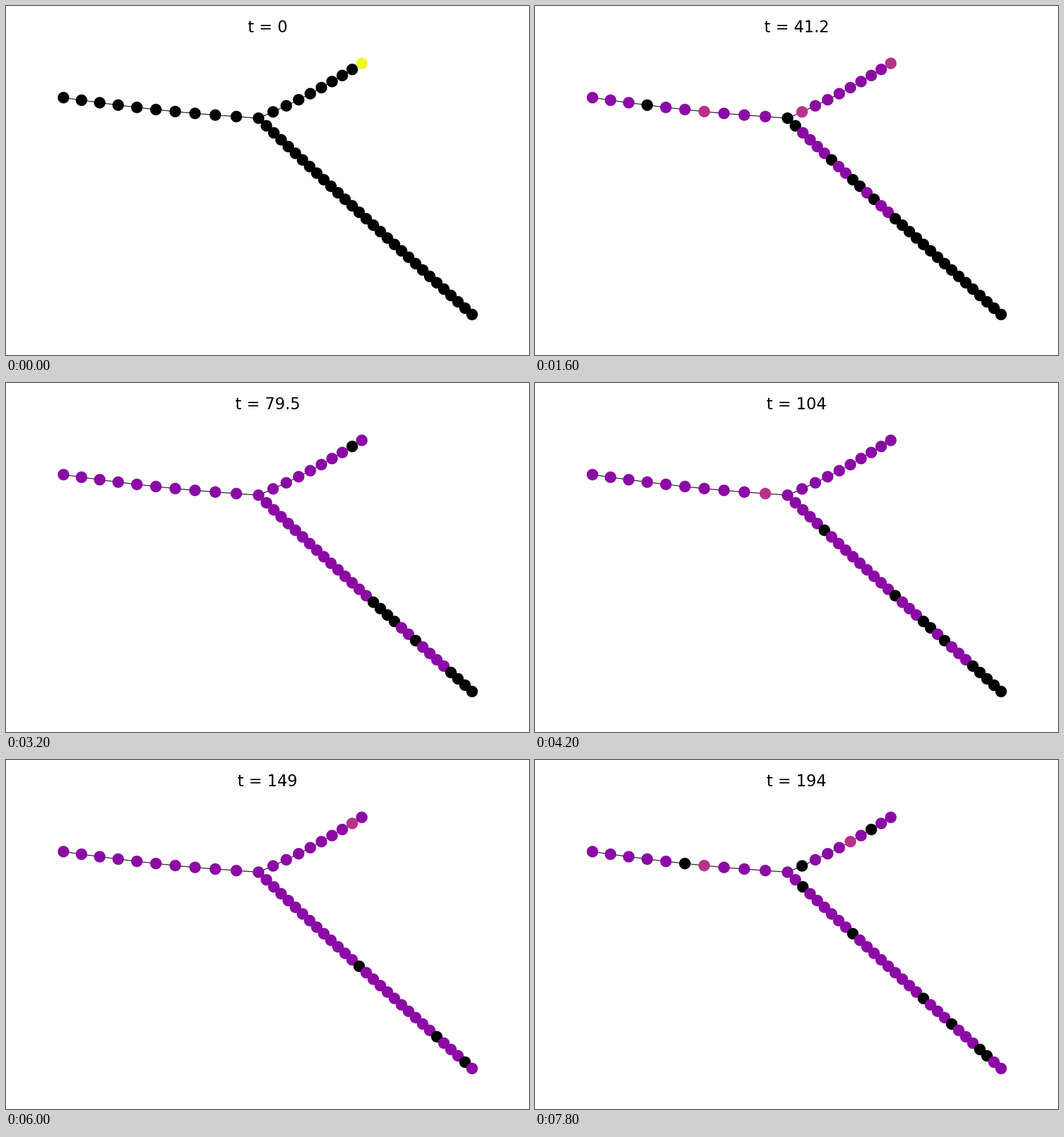
Write a matplotlib script that moves like this. It is 917 px wide and 611 px high and loops after 8000 ms.

```python
import numpy as np
import matplotlib.pyplot as plt
from matplotlib.animation import FuncAnimation

W, H, DPI = 917, 611, 100
FRAMES, STEP = 40, 200
HUB = (442.8, 196.4)
LEFT, UPPER, LOWER = 10, 9, 30   # nodes per arm


def basis(k):
    """Terms of a step length that shrinks smoothly away from the hub."""
    i = np.arange(1, max(k) + 1)
    logs = np.append(0, np.cumsum(np.log(i)))
    inverse = np.append(0, np.cumsum(1 / i))
    return np.column_stack([np.ones(len(k)), k, logs[k], inverse[k]])


def arm(count, knots, points):
    """Hub and nodes of one arm, fitted through a few key points."""
    coef = np.linalg.solve(basis([0, *knots]), np.array([HUB, *points]))
    return basis(np.arange(count + 1)) @ coef


arms = [
    arm(LEFT, [3, 6, LEFT], [(331.4, 188.0), (229.5, 177.5), (100.8, 160.4)]),
    arm(UPPER, [2, 5, UPPER], [(491.5, 174.7), (553.0, 142.9), (623.8, 100.4)]),
    arm(LOWER, [2, 10, LOWER], [(469.6, 222.1), (569.7, 315.6), (817.2, 540.1)]),
]
pos = np.vstack([[HUB]] + [a[1:] for a in arms])

# Steps from the starting tip, the end of the upper arm
dist = UPPER + np.concatenate([[0], np.arange(1, LEFT + 1),
                               -np.arange(1, UPPER + 1), np.arange(1, LOWER + 1)])


def spread(seed=4, keep=0.6, sigma=0.33):
    """Counts per frame: a pulse at the tip that evens out, with lasting noise."""
    rng = np.random.default_rng(seed)
    noise = rng.normal(size=dist.size)
    counts = [np.where(dist == 0, 6, 0)]
    for f in range(1, FRAMES):
        noise = keep * noise + np.sqrt(1 - keep ** 2) * rng.normal(size=dist.size)
        reach = 5.5 * f ** 0.67
        mean = (0.9 + 2.8 / f) * np.exp(-(dist / reach) ** 2)
        level = np.rint(mean + sigma * np.sqrt(mean) * noise)
        counts.append(level.clip(0, 6).astype(int))
    return counts


counts = spread()
times = np.interp(range(FRAMES), [0, 8, 16, 39], [0, 41.2, 79.5, 193.9])
plasma = plt.get_cmap("plasma")
palette = np.array([(0, 0, 0, 1)] + [plasma((n + 1) / 7) for n in range(1, 7)])

fig = plt.figure(figsize=(W / DPI, H / DPI), dpi=DPI, facecolor="white")
ax = fig.add_axes([0, 0, 1, 1])
ax.set(xlim=(0, W), ylim=(H, 0))
ax.axis("off")

for a in arms:
    ax.plot(*a.T, color="black", lw=0.9, zorder=1)
dots = ax.scatter(*pos.T, s=(20.2 * 72 / DPI) ** 2, c=palette[counts[0]],
                  linewidths=0, zorder=2)
title = ax.text(W / 2, 46, "t = 0", fontsize=20, family="DejaVu Sans",
                ha="center", va="baseline")


def update(f):
    dots.set_facecolor(palette[counts[f]])
    title.set_text(f"t = {times[f]:.3g}")
    return dots, title


anim = FuncAnimation(fig, update, frames=FRAMES, interval=STEP,
                     repeat=True, repeat_delay=0)
plt.show()
```
